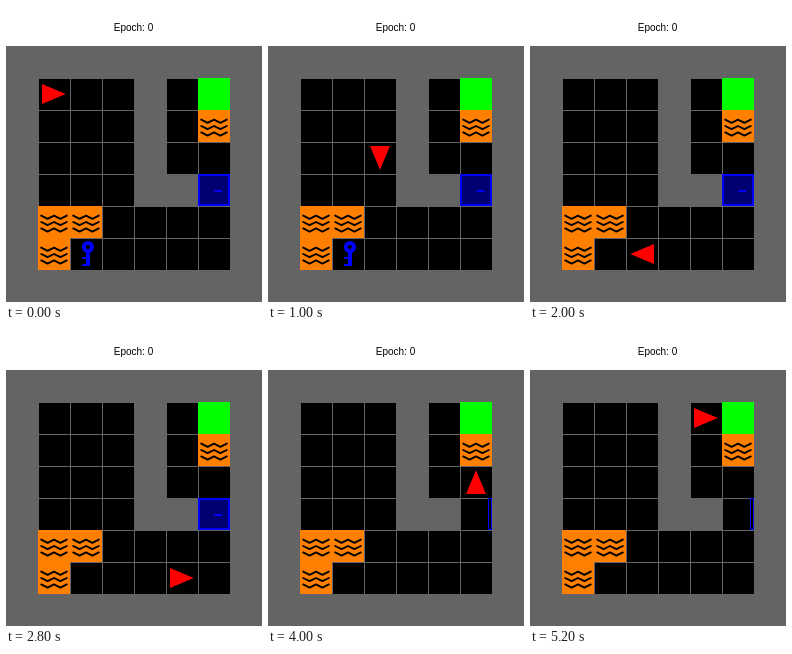
Write an HTML page that moves like this. It is 256 by 296 pixels and loops after 5.4 s.

```html
<!DOCTYPE html>
<html lang="en">
<head>
<meta charset="utf-8">
<title>Door and key</title>
<style>
  html, body { margin: 0; width: 100%; height: 100%; overflow: hidden; background: #fff; }
  svg { display: block; }
  text { font: 10px "Liberation Sans", Arial, sans-serif; }
</style>
</head>
<body>
<svg id="stage" width="256" height="296" viewBox="0 0 256 296">
  <defs>
    <g id="floor"><path d="M0 0h32v32h-32z" fill="#646464"/><path d="M1 1h31v31h-31z"/></g>
    <path id="goal" d="M0 0h32v32h-32z" fill="#0f0"/>
    <g id="lava">
      <path d="M0 0h32v32h-32z" fill="#ff8000"/>
      <path id="waves" fill="none" stroke="#000" stroke-width="1.92" stroke-linecap="round" stroke-linejoin="round"/>
    </g>
    <g id="key" fill="#00f">
      <path d="M16 10h4v18h-4zM12.2 19h3.8v2h-3.8zM12.2 26h3.8v2h-3.8z"/>
      <circle cx="17.92" cy="8.96" r="6.08"/>
      <circle cx="17.92" cy="8.96" r="2.05" fill="#000"/>
    </g>
    <g id="locked" fill="#00f">
      <path d="M0 0h32v32h-32z"/>
      <path d="M2 2h28v28h-28z" fill="#000072"/>
      <path d="M16.67 16h7.33v2h-7.33z"/>
    </g>
    <g id="open"><path d="M28 0h4v32h-4z" fill="#00f"/><path d="M29 1h2v30h-2z"/></g>
  </defs>
  <rect width="256" height="296" fill="#fff"/>
  <text x="127.5" y="25" text-anchor="middle">Epoch: 0</text>
  <g id="board" transform="translate(0 40)"><rect width="256" height="256" fill="#646464"/></g>
</svg>
<script>
const CELL = 32, STEP_MS = 200;
const board = document.getElementById("board");

// # wall, . floor, G goal, L lava, K key, D door
const map = [
  "########",
  "#...#.G#",
  "#...#.L#",
  "#...#..#",
  "#...##D#",
  "#LL....#",
  "#LK....#",
  "########"
];

// F forward, L / R turn, P pick up key, U unlock door
const actions = "FFRFFF" + "FFRPLL" + "FFFLFU" + "FFLFRF" + "FR";
const headings = [[1, 0], [0, 1], [-1, 0], [0, -1]];

function add(tag, attrs) {
  const node = document.createElementNS("http://www.w3.org/2000/svg", tag);
  for (const name in attrs) node.setAttribute(name, attrs[name]);
  return board.appendChild(node);
}

const place = (id, col, row) => add("use", { href: "#" + id, x: col * CELL, y: row * CELL });
const show = (node, visible) => node.setAttribute("visibility", visible ? "visible" : "hidden");

document.getElementById("waves").setAttribute("d", [0, 1, 2].map(i => {
  const top = CELL * (0.3 + 0.2 * i), low = top + 3.2;
  return `M3.2 ${top}L9.6 ${low}L16 ${top}L22.4 ${low}L28.8 ${top}`;
}).join(""));

let key, locked, opened;
map.forEach((line, row) => [...line].forEach((kind, col) => {
  if (kind === "#") return;
  place("floor", col, row);
  if (kind === "G") place("goal", col, row);
  if (kind === "L") place("lava", col, row);
  if (kind === "K") key = place("key", col, row);
  if (kind === "D") {
    locked = place("locked", col, row);
    opened = place("open", col, row);
  }
}));
const agent = add("polygon", { points: "4,6.08 27.84,16 4,25.92", fill: "#f00" });

const states = [{ col: 1, row: 1, dir: 0, hasKey: false, unlocked: false }];
for (const action of actions) {
  const next = { ...states[states.length - 1] };
  if (action === "F") {
    next.col += headings[next.dir][0];
    next.row += headings[next.dir][1];
  }
  if (action === "L") next.dir = (next.dir + 3) % 4;
  if (action === "R") next.dir = (next.dir + 1) % 4;
  if (action === "P") next.hasKey = true;
  if (action === "U") next.unlocked = true;
  states.push(next);
}

function render(ms) {
  const s = states[Math.floor(ms / STEP_MS) % states.length];
  agent.setAttribute("transform",
    `translate(${s.col * CELL} ${s.row * CELL}) rotate(${s.dir * 90} 16 16)`);
  show(key, !s.hasKey);
  show(locked, !s.unlocked);
  show(opened, s.unlocked);
}

const start = performance.now();
function tick() {
  render(performance.now() - start);
  requestAnimationFrame(tick);
}
tick();
</script>
</body>
</html>
```
